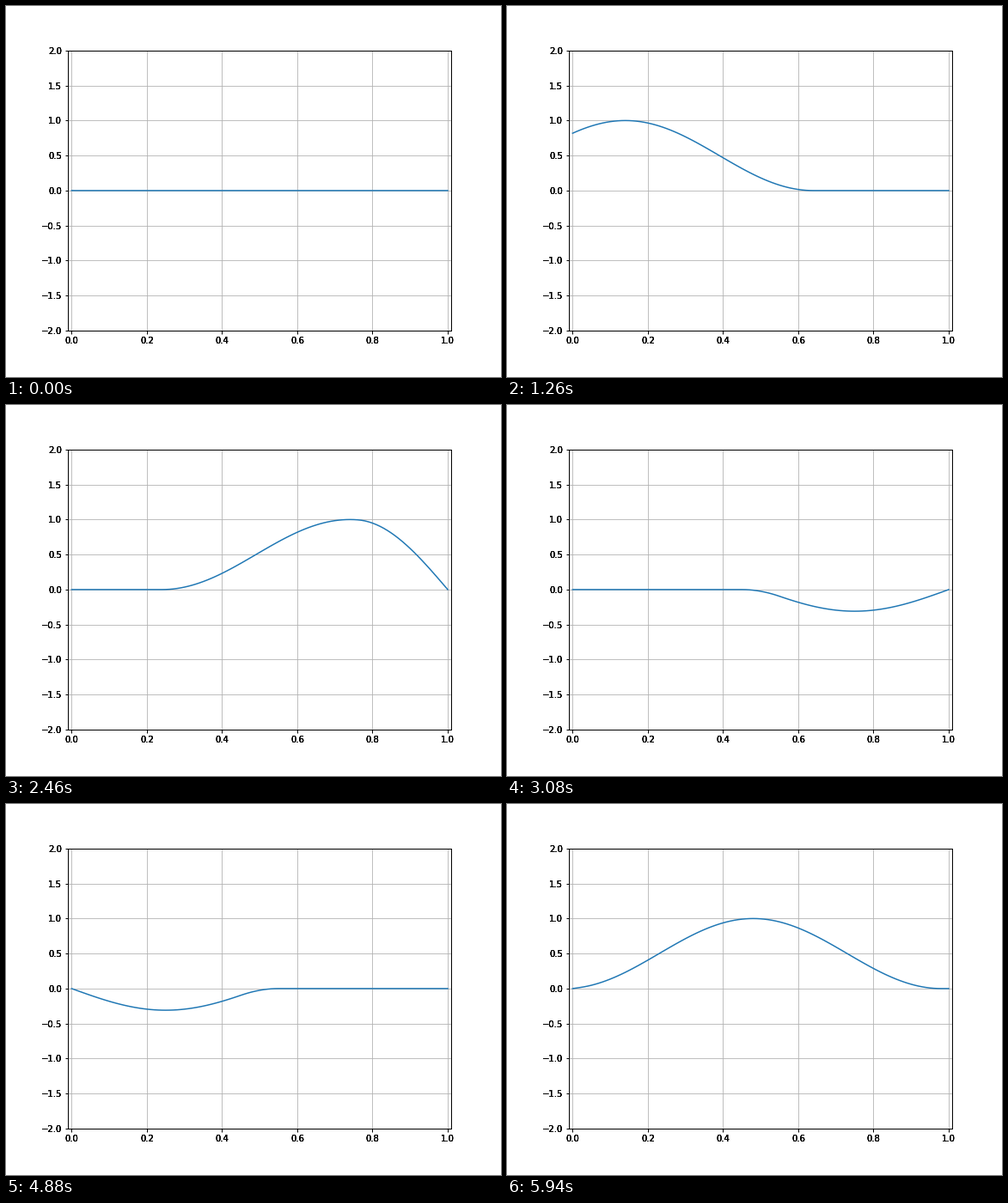
A matplotlib script for the animation above (5960 ms loop, 576 by 432 pixels).

```python
import numpy as np
import matplotlib.pyplot as plt
from matplotlib.animation import FuncAnimation

FRAMES = 298
INTERVAL = 20
DT = 0.01
LABEL_PASSES = 3  # extra passes that darken the label edges

plt.rcParams["font.family"] = "DejaVu Sans"
plt.rcParams["font.size"] = 10

x = np.linspace(0, 1, 101)


def pulse(s):
    """One sin^2 hump on 0..1, zero elsewhere."""
    return np.where((s > 0) & (s < 1), np.sin(np.pi * s) ** 2, 0.0)


def wave(t):
    """Pulse fed in at x=0, then reflected with a sign flip at both ends."""
    return pulse(t - x) - pulse(t - 2 + x) + pulse(t - 2 - x) - pulse(t - 4 + x)


fig = plt.figure(figsize=(8, 6), dpi=72, facecolor="white")
fig.subplots_adjust(left=0.125, right=0.9, bottom=0.125, top=0.88)
ax = fig.add_subplot()
ax.set_xlim(-0.01, 1.01)
ax.set_ylim(-2, 2)
xticks = np.arange(6) * 0.2
yticks = np.arange(-4, 5) * 0.5
ax.set_xticks(xticks)
ax.set_yticks(yticks)
ax.grid(True, color="#b0b0b0", linewidth=0.8)
ax.tick_params(length=3.5, width=1, pad=3.5)
for spine in ax.spines.values():
    spine.set_linewidth(1)


def label(value):
    return f"{value:.1f}".replace("-", "\u2212")


x_trans, x_va, x_ha = ax.get_xaxis_text1_transform(7)
y_trans, y_va, y_ha = ax.get_yaxis_text1_transform(7)
for _ in range(LABEL_PASSES):
    for v in xticks:
        ax.text(v, 0, label(v), transform=x_trans, va=x_va, ha=x_ha)
    for v in yticks:
        ax.text(0, v, label(v), transform=y_trans, va=y_va, ha=y_ha)

line, = ax.plot(x, wave(DT), color="#1f77b4", linewidth=1.5)


def update(i):
    line.set_ydata(wave((i + 1) * DT))
    return line,


anim = FuncAnimation(fig, update, frames=FRAMES, interval=INTERVAL,
                     repeat=True, repeat_delay=0)
plt.show()
```
